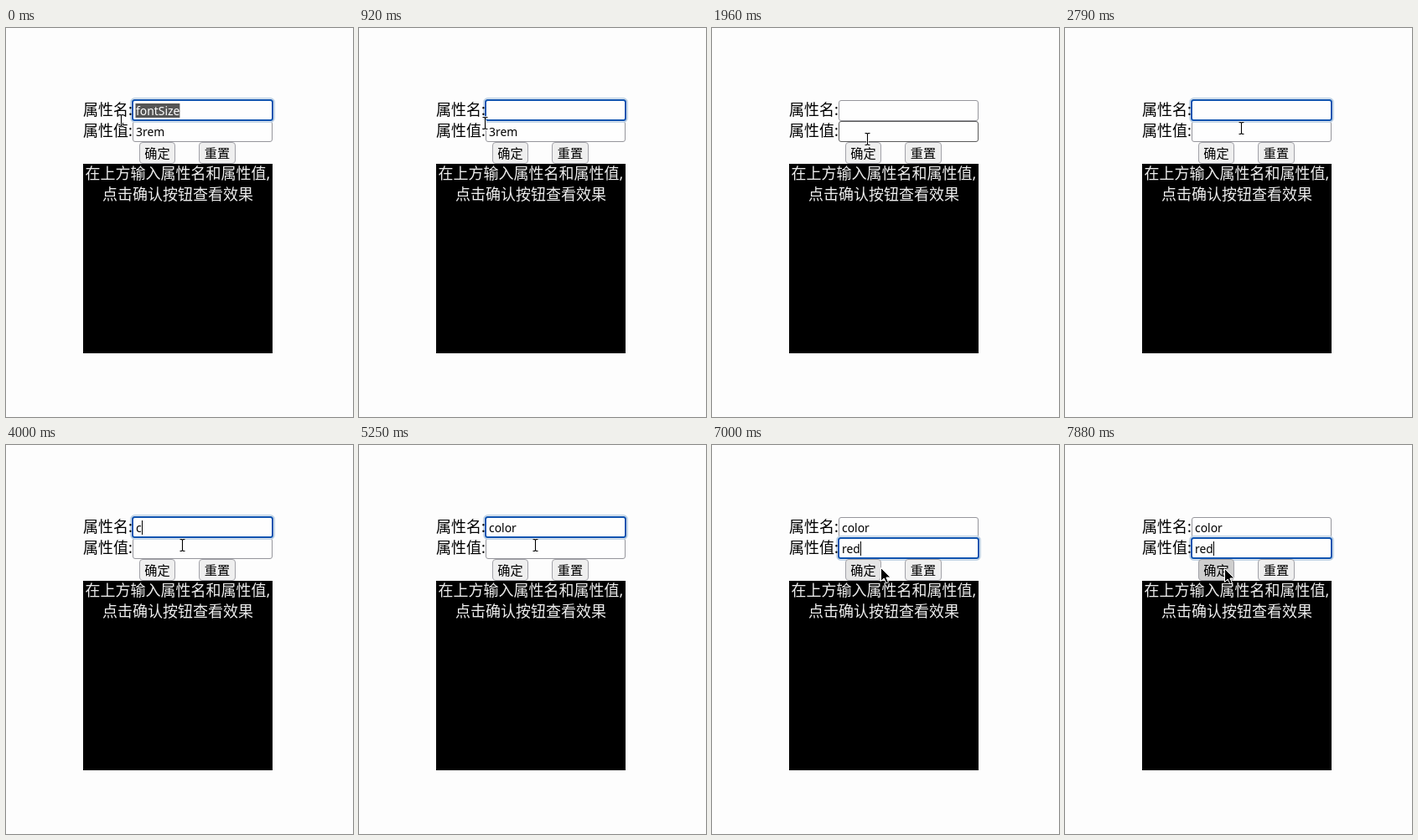
An HTML page that plays this animation: 414 px wide and 464 px high, repeating every 8000 ms.

```html
<!DOCTYPE html>
<html lang="zh-CN">
<head>
<meta charset="utf-8">
<style>
html, body { margin: 0; width: 100%; height: 100%; overflow: hidden; background: #fdfdfd; }
svg { display: block; width: 414px; height: 464px; font-family: "Noto Sans", "Noto Sans CJK SC", "Noto Sans CJK", sans-serif; }
text { white-space: pre; }
.label { font-size: 18px; }
.input { font-size: 13.9px; }
.button { font-size: 15.2px; text-anchor: middle; }
.hint { font-size: 18px; text-anchor: middle; fill: #eee; }
</style>
</head>
<body>
<svg id="stage" viewBox="0 0 414 464"></svg>
<script>
const LOOP = 8000;
const stage = document.getElementById("stage");

function add(tag, attrs, text = "", parent = stage) {
  const node = document.createElementNS("http://www.w3.org/2000/svg", tag);
  set(node, attrs);
  node.textContent = text;
  parent.append(node);
  return node;
}

function set(node, attrs) {
  for (const key in attrs) node.setAttribute(key, attrs[key]);
}

const show = (node, on) => set(node, { visibility: on ? "visible" : "hidden" });
const within = (t, spans) => spans.some(([from, to]) => t >= from && t < to);

function box(x, y, width, height, attrs) {
  return add("rect", { x, y, width, height, ...attrs });
}

function makeField(y) {
  return { y, border: box(151.5, y + .5, 166, 24, { rx: 2.5, fill: "#fefefe" }) };
}

// Focus ring, text and label sit above both field borders.
function finishField(field, label) {
  const y = field.y;
  field.glow = box(148.75, y - 2.25, 171.5, 28.5, { rx: 5, fill: "#fefefe", stroke: "#bfd2e4", "stroke-width": 1.5 });
  field.ring = box(151, y, 167, 24, { rx: 2.5, fill: "#fefefe", stroke: "#1054b0", "stroke-width": 2 });
  field.mark = box(154.5, y + 4, 0, 17, { fill: "#555" });
  field.text = add("text", { class: "input", x: 155, y: y + 18 });
  field.caret = box(155, y + 4, 1, 17, { fill: "#000" });
  add("text", { class: "label", x: 92, y: y + 18 }, label);
}

function drawField(field, { value, focused, selected, caret, hovered }) {
  if (field.text.textContent !== value) field.text.textContent = value;
  const width = value ? field.text.getComputedTextLength() : 0;
  set(field.border, { stroke: hovered ? "#5a5a5a" : "#96969c" });
  set(field.mark, { width: selected ? width + .5 : 0 });
  set(field.text, { fill: selected ? "#fff" : "#000" });
  set(field.caret, { x: Math.round(155 + width) });
  show(field.glow, focused);
  show(field.ring, focused);
  show(field.caret, caret);
}

function makeButton(x, width, label) {
  const face = box(x + .5, 136.5, width, 25, { rx: 3.5, fill: "#efefef", stroke: "#a2a2a8" });
  add("text", { class: "button", x: x + .5 + width / 2, y: 155 }, label);
  return face;
}

const nameField = makeField(86);
const valueField = makeField(111);
finishField(nameField, "属性名:");
finishField(valueField, "属性值:");
const confirmButton = makeButton(159, 42, "确定");
makeButton(230, 43, "重置");
box(92, 162, 226, 226, { fill: "#000" });
add("text", { class: "hint", x: 205, y: 180 }, "在上方输入属性名和属性值,");
add("text", { class: "hint", x: 205, y: 204.5 }, "点击确认按钮查看效果");

const beam = add("g", { fill: "none" });
const beamPath = "M-3-7H-1L0-6L1-7H3M0-6V6M-3 7H-1L0 6L1 7H3";
add("path", { d: beamPath, stroke: "#fff", "stroke-width": 2.6 }, "", beam);
add("path", { d: beamPath, stroke: "#000", "stroke-width": 1.1 }, "", beam);
const arrow = add("path", {
  d: "M0 0V16L3.7 12.5L6.4 18.3L9 17.1L6.4 11.5H11.5Z",
  fill: "#000", stroke: "#fff"
});

const pointerPath = [
  [0, 137, 110], [250, 137, 110], [380, 142, 112], [880, 142, 112],
  [1080, 180, 118], [1330, 226, 142], [1430, 235, 126], [1580, 14, 128],
  [1710, 14, 128], [1960, 186, 132], [2150, 60, 126], [2380, 82, 138],
  [2580, 82, 138], [2790, 210, 119], [6050, 210, 119], [6380, 210, 140],
  [6580, 210, 143], [6800, 210, 145], [7250, 190, 147], [8000, 190, 147]
];

function pointerAt(t) {
  const i = pointerPath.findIndex(key => key[0] > t);
  const [t0, x0, y0] = pointerPath[i - 1];
  const [t1, x1, y1] = pointerPath[i];
  const k = (t - t0) / (t1 - t0);
  return [Math.round(x0 + (x1 - x0) * k), Math.round(y0 + (y1 - y0) * k)];
}

const typed = (word, times, t) => word.slice(0, times.filter(at => t >= at).length);

function render(t) {
  const [x, y] = pointerAt(t);
  const onConfirm = x >= 159 && x <= 202 && y >= 136 && y <= 162;

  drawField(nameField, {
    value: t < 880 ? "fontSize" : typed("color", [3460, 4330, 4500, 4750, 4920], t),
    focused: within(t, [[0, 1430], [2750, 5790]]),
    selected: t < 880,
    caret: within(t, [[3290, 5250], [5460, 5790]])
  });
  drawField(valueField, {
    value: t < 1750 ? "3rem" : typed("red", [6250, 6500, 6750], t),
    focused: within(t, [[1430, 1880], [5790, LOOP]]),
    selected: within(t, [[1500, 1750]]),
    caret: within(t, [[5790, 7250], [7710, LOOP]]),
    hovered: t > 1880 && t < 2100 && x > 151
  });

  set(confirmButton, { fill: t >= 7710 ? "#cecece" : onConfirm ? "#e5e5e5" : "#efefef" });
  const pointing = x < 88 || onConfirm;
  show(beam, !pointing);
  show(arrow, pointing);
  set(beam, { transform: `translate(${x + .5} ${y + .5})` });
  set(arrow, { transform: `translate(${x + .5} ${y + .5})` });
}

const start = performance.now();
function tick() {
  render((performance.now() - start) % LOOP);
  requestAnimationFrame(tick);
}
tick();
</script>
</body>
</html>
```
